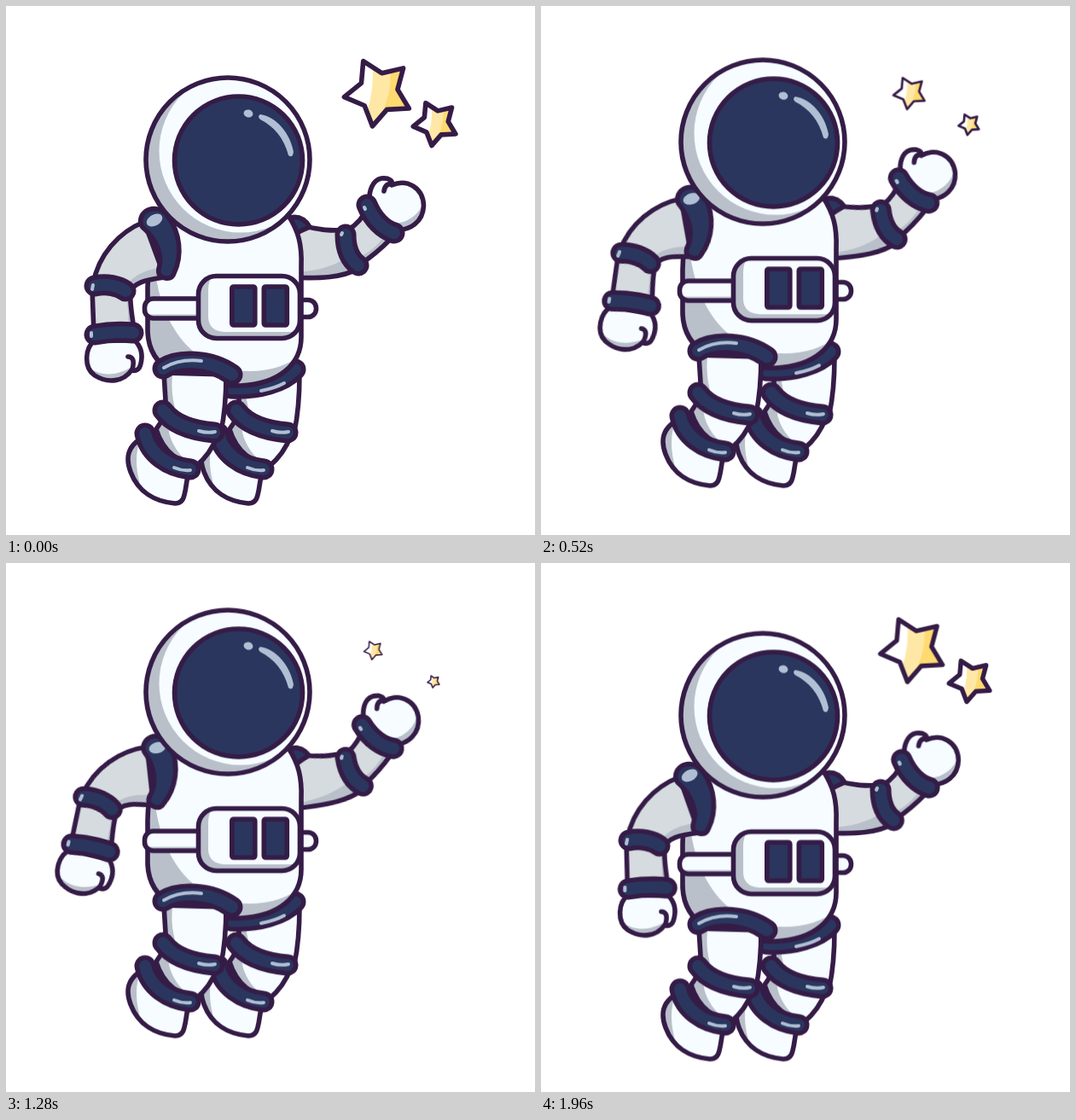
These frames come from a looping animation (620x620 px, 2 s). An HTML page:

```html
<!DOCTYPE html>
<html lang="en">
<head>
<meta charset="utf-8">
<title>Floating astronaut</title>
<style>
  html, body { margin: 0; width: 100%; height: 100%; overflow: hidden; background: #fff; }
  svg { display: block; width: 100vw; height: 100vh; }
  .line { fill: none; stroke: #351c47; stroke-width: 5.6; stroke-linejoin: round; stroke-linecap: round; }
  .rim, .band, .shine { fill: none; stroke-linecap: round; stroke-linejoin: round; }
  .rim { stroke: #351c47; stroke-width: 25; }
  .band { stroke: #2a365d; stroke-width: 14; }
  .shine { stroke: #b0bfd4; stroke-width: 4; }
  .glint { fill: #b0bfd4; }

  /* every motion goes out and back in 40 ms steps */
  .float, .armL, .armR, .star { animation: 2s steps(25) infinite; }
  .float { animation-name: float; }
  .armL { animation-name: swingL; transform-origin: 199px 262px; }
  .armR { animation-name: swingR; transform-origin: 325px 262px; }
  .star { animation-name: shrink; }
  @keyframes float { 0%, 100% { transform: translateY(0); } 50% { transform: translateY(-40px); } }
  @keyframes swingL { 0%, 100% { transform: rotate(0deg); } 50% { transform: rotate(19.5deg); } }
  @keyframes swingR { 0%, 100% { transform: rotate(0deg); } 50% { transform: rotate(-12.2deg); } }
  @keyframes shrink { 0%, 100% { transform: scale(1); } 50% { transform: scale(0); } }
</style>
</head>
<body>
<svg id="stage" viewBox="0 0 620 620"></svg>
<script>
const WHITE = '#f6fcff', SHADE = '#b9c0ca', GREY = '#d5dbde', NAVY = '#2a365d';
let clips = 0;

const path = (d, attrs) => `<path d="${d}" ${attrs}/>`;
const group = (attrs, ...items) => `<g ${attrs}>${items.join('')}</g>`;
const circle = (x, y, r) => `M${x - r} ${y}a${r} ${r} 0 1 1 ${2 * r} 0a${r} ${r} 0 1 1 ${-2 * r} 0z`;
const box = (x, y, w, h, r) =>
  `M${x + r} ${y}h${w - 2 * r}a${r} ${r} 0 0 1 ${r} ${r}v${h - 2 * r}a${r} ${r} 0 0 1 ${-r} ${r}` +
  `h${2 * r - w}a${r} ${r} 0 0 1 ${-r} ${-r}v${2 * r - h}a${r} ${r} 0 0 1 ${r} ${-r}z`;

// A filled shape, inner areas clipped to it, and its outline on top
function part(d, fill, ...areas) {
  const id = 'clip' + clips++;
  const inner = areas.map(([a, color]) => path(a, `fill="${color}"`)).join('');
  return `<clipPath id="${id}">${path(d, '')}</clipPath>` + path(d, `fill="${fill}"`) +
    `<g clip-path="url(#${id})">${inner}</g>` + path(d, 'class="line"');
}

const ring = (d, shine) =>
  path(d, 'class="rim"') + path(d, 'class="band"') + path(shine, 'class="shine"');

function leg(dx) {
  return group(`transform="translate(${dx} 0)"`,
    part('M160 506C142 516 140 530 146 546C155 570 175 581 198 583Q207 583 209 573C212 562 211 555 215 545Z', WHITE,
      ['M135 500H162C149 520 151 546 162 576H135Z', SHADE]),
    part('M188 478L176 496C185 525 205 535 222 540Q240 525 248 503Z', WHITE,
      ['M170 480H193C186 496 194 515 208 530L190 545L165 505Z', SHADE]),
    ring('M163 501C168 525 190 540 216 543', 'M197 541Q206 545 216 544'),
    part('M185 430L188 478C210 496 230 498 252 499C257 475 258 455 258 432Z', WHITE,
      ['M180 425H196C192 450 196 470 205 490L180 484Z', SHADE]),
    ring('M184 474C197 492 222 498 244 500', 'M226 498Q236 501 245 499'));
}

function star(px, py, x, y, r) {
  let d = '';
  for (let i = 0; i < 10; i++) {
    const a = (-116 + 36 * i) * Math.PI / 180, q = i % 2 ? r * 0.56 : r;
    d += `${i ? 'L' : 'M'}${(x + q * Math.cos(a)).toFixed(2)} ${(y + q * Math.sin(a)).toFixed(2)}`;
  }
  const at = (u, v) => `${x + u * r} ${y + v * r}`;
  const glow = `M${at(-.2, -1)}Q${at(-.05, 0)} ${at(-.5, 1)}L${at(1, 1)}L${at(1, -1)}Z`;
  const deep = `M${at(.3, -1)}Q${at(.52, .1)} ${at(-.2, 1.1)}L${at(1, 1)}L${at(1, -1)}Z`;
  return group(`class="star" style="transform-origin:${px}px ${py}px"`,
    part(d + 'Z', '#fff', [glow, '#ffe8a6'], [deep, '#ffda70']));
}

const armR = group('class="armR"',
  part('M330 262C352 252 365 267 396 262L412 308C395 318 370 320 330 318Z', GREY,
    ['M325 312C358 313 386 306 402 292L425 325H325Z', SHADE]),
  part('M326 250Q346 242 356 259Q346 263 338 268Z', NAVY),
  part('M400 263C412 256 420 245 424 235L456 268C446 278 435 290 416 302Z', GREY,
    ['M458 266L446 266C438 278 428 288 410 297L416 306Z', SHADE]),
  ring('M398 268C398 282 402 296 413 304', 'M393 268L394 266'),
  part('M426 230C425 216 430 204 440 202C449 201 454 205 452 210C470 202 489 213 489.500 234C489 253 473 264 456 262C440 256 430 246 426 230Z', WHITE,
    ['M440 251C462 260 481 250 490 230L500 250L465 272Z', SHADE]),
  path('M453 208Q444 208 443 217', 'class="line"'),
  ring('M423 233C430 250 442 262 455 266', 'M420 236L421 238'));

const armL = group('class="armL"',
  part('M162 253C132 265 108 292 102 326L143 338C150 324 162 321 186 318Z', GREY,
    ['M190 306C164 308 147 316 136 334L150 345L190 325Z', SHADE]),
  part('M101 332Q102 358 103 384L151 384C148 365 145 350 146 338Z', GREY,
    ['M139 330Q145 358 143 390H156V330Z', SHADE]),
  ring('M104 328C118 325 132 328 140 334', 'M102 327L101 332'),
  part('M104 392C92 401 91 424 104 433C120 443 138 440 147 427Q156 429 158 419C161 407 157 398 151 392Z', WHITE,
    ['M92 418C106 435 128 435 147 423L150 446H95Z', SHADE]),
  path('M143 411Q152 411 148 426', 'class="line"'),
  ring('M104 385Q126 381 149 383', 'M100 383L100 387'),
  part('M158 249C162 234 184 234 190 247C204 266 207 292 197 313Q195 320 187 319L181 317Q177 313 180 304C183 289 175 273 163 262Q156 257 158 249Z', NAVY),
  '<ellipse class="glint" cx="174" cy="251" rx="10" ry="6.500" transform="rotate(-28 174 251)"/>');

const torso =
  part(box(335, 344.5, 28.5, 20, 9.5), WHITE) +
  part('M198 252C176 272 166 298 166 330V382C168 425 205 445 275 445C320 443 346 420 346 388V305C347 280 343 264 330 244Z', WHITE,
    ['M160 290H173C176 360 208 426 285 428Q325 428 350 405V455H160Z', SHADE]);

const belt =
  part(box(162.5, 343, 75, 23, 10), WHITE, ['M160 361.500H240V370H160Z', SHADE]) +
  part(box(225.5, 316.5, 119, 73, 21), WHITE,
    ['M220 310H247Q237 319 237 333V365Q238 381 256 382H350V395H220Z', SHADE]) +
  part(box(264.8, 329, 27, 45, 2), NAVY) +
  part(box(302.3, 329, 27, 45, 2), NAVY);

const head =
  part(circle(260, 180, 96), SHADE, [circle(275, 170, 95.5), WHITE]) +
  part(circle(272.5, 181, 75), NAVY) +
  '<ellipse class="glint" cx="284" cy="126" rx="5.500" ry="4.500" transform="rotate(12 284 126)"/>' +
  path('M298 127C317 130 333 149 337 171Q336 179 331 175C326 155 314 141 298 133Q294 129 298 127Z', 'class="glint"');

document.getElementById('stage').innerHTML =
  group('class="float"',
    armR,
    leg(86),
    ring('M264 448C295 450 325 441 339 426', 'M299 451Q315 448 326 442'),
    torso,
    leg(0),
    ring('M184 425C202 413 240 414 265 432', 'M185 424Q204 413 229 416'),
    belt, armL, head) +
  star(428.5, 102.5, 436.5, 101, 40.5) +
  star(500.5, 139.5, 503.5, 137.5, 26.5);
</script>
</body>
</html>
```
